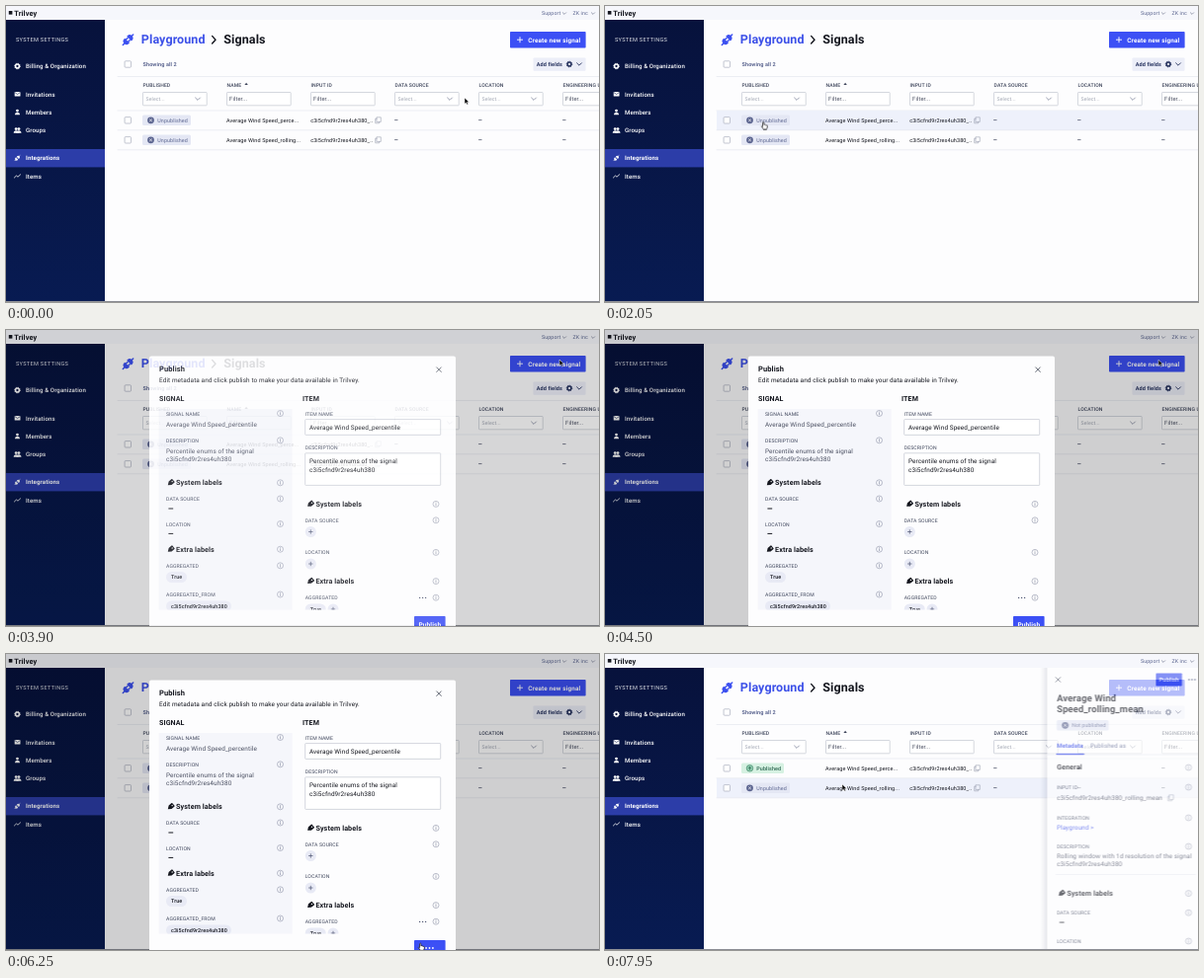
Write an HTML page that moves like this. It is 600 by 300 pixels and loops after 8 s.

```html
<!DOCTYPE html>
<html lang="en">
<head>
<meta charset="utf-8">
<title>Publishing a signal</title>
<style>
html, body { margin: 0; width: 100%; height: 100%; overflow: hidden; background: #fdfdfe; }
svg { display: block; width: 100vw; height: 100vh; }
text { font-family: Roboto, Arial, sans-serif; letter-spacing: .1px; fill: #15171f; text-rendering: geometricPrecision; white-space: pre; }
.bold { font-weight: 700; }
.mid { font-weight: 500; }
.white { fill: #fff; }
.blue { fill: #3c50e8; }
.soft { fill: #4b5062; }
.label { fill: #3f465c; }
.slate { fill: #5d6791; }
.navy { fill: #27335f; }
.hint { fill: #a3a8b5; }
.line { fill: none; stroke-linecap: round; stroke-linejoin: round; }

/* One loop is 8 s, so 1% is 80 ms. */
.hard, .ease { animation: 8s infinite both; }
.hard { animation-timing-function: step-end; }
.ease { animation-timing-function: linear; }
#cursor { animation-name: travel; animation-timing-function: ease-in-out; }
#arrow { animation-name: arrow; }
#hand { animation-name: hand; }
#hover1 { animation-name: hover1; }
#hover2 { animation-name: hover2; }
#before { animation-name: before; }
#after { animation-name: after; }
#first { animation-name: first; }
#first .press { animation-name: press; }
#second { animation-name: second; }
#modal { animation-name: modal; }
#idle { animation-name: idle; }
#busy { animation-name: busy; }

@keyframes travel {
  0%, 18.75% { transform: translate(464px, 93px); }
  24.75%, 31.9% { transform: translate(160px, 117.5px); }
  39%, 47.4% { transform: translate(559px, 30.5px); }
  47.5%, 56% { transform: translate(560px, 30px); }
  70%, 79.4% { transform: translate(419px, 293px); }
  86.25%, 89.4% { transform: translate(402px, 279px); }
  96.25%, 100% { transform: translate(240px, 132px); }
}
@keyframes hand {
  0% { opacity: 0; } 22% { opacity: 1; } 33.8% { opacity: 0; }
  38.5% { opacity: 1; } 47.5% { opacity: 0; } 69.2% { opacity: 1; } 78.75%, 100% { opacity: 0; }
}
@keyframes arrow {
  0% { opacity: 1; } 22% { opacity: 0; } 33.8% { opacity: 1; }
  38.5% { opacity: 0; } 47.5% { opacity: 1; } 69.2% { opacity: 0; } 78.75%, 100% { opacity: 1; }
}
@keyframes hover1 { 0% { opacity: 0; } 22% { opacity: 1; } 33.8%, 100% { opacity: 0; } }
@keyframes hover2 { 0% { opacity: 0; } 94.9%, 100% { opacity: 1; } }
@keyframes before { 0% { opacity: 1; } 80%, 100% { opacity: 0; } }
@keyframes after { 0% { opacity: 0; } 80%, 100% { opacity: 1; } }
@keyframes first {
  0%, 28.1% { opacity: 0; transform: translateX(14px); }
  29.4% { opacity: .62; transform: translateX(5.5px); }
  30.4%, 47.4% { opacity: 1; transform: none; }
  47.5%, 100% { opacity: 0; transform: none; }
}
@keyframes second {
  0%, 98.1% { opacity: 0; transform: translateX(14px); }
  99.375% { opacity: .62; transform: translateX(5.5px); }
  100% { opacity: 1; transform: none; }
}
@keyframes press { 0% { fill: #3c50f0; } 38.5%, 100% { fill: #2e3fc4; } }
@keyframes modal {
  0%, 47.2% { opacity: 0; } 49%, 78.7% { opacity: 1; } 78.75%, 100% { opacity: 0; }
}
@keyframes idle { 0% { opacity: 1; } 75% { opacity: 0; } 78.75%, 100% { opacity: 1; } }
@keyframes busy { 0% { opacity: 0; } 75% { opacity: 1; } 78.75%, 100% { opacity: 0; } }
</style>
</head>
<body>
<script>
const ID = 'c3i5cfnd9r2res4uh380';
const BRAND = 'Trilvey';

const text = (x, y, str, size = 6.4, cls = '') =>
  `<text x="${x}" y="${y}" font-size="${size}" class="${cls}">${str}</text>`;
const rect = (x, y, w, h, fill, r = 0, extra = '') =>
  `<rect x="${x}" y="${y}" width="${w}" height="${h}" rx="${r}" fill="${fill}" ${extra}/>`;
const line = (d, color = '#15171f', width = .8) =>
  `<path class="line" d="${d}" stroke="${color}" stroke-width="${width}"/>`;
const dot = (x, y, r, fill, extra = '') => `<circle cx="${x}" cy="${y}" r="${r}" fill="${fill}" ${extra}/>`;
const group = (x, y, body, scale = 1, turn = 0) =>
  `<g transform="translate(${x} ${y}) rotate(${turn}) scale(${scale})">${body}</g>`;

const box = (x, y, w, h) => rect(x, y, w, h, '#fff', .6, 'stroke="#c3c7d2" stroke-width=".7"');
const check = (x, y) => rect(x - 3.2, y - 3.2, 6.4, 6.4, '#fff', .8, 'stroke="#a9aebd" stroke-width=".7"');
const chevron = (x, y, color = '#8e94a6', s = 2.4) =>
  line(`M${x - s} ${y - s / 2}l${s} ${s}l${s} ${-s}`, color, .9);
const cross = (x, y, s = 2.3, color = '#3e4454', w = .8) =>
  line(`M${x - s} ${y - s}l${2 * s} ${2 * s}m0 ${-2 * s}l${-2 * s} ${2 * s}`, color, w);
const plus = (x, y, s, color, w = .8) => line(`M${x - s} ${y}h${2 * s}M${x} ${y - s}v${2 * s}`, color, w);
const info = (x, y) => dot(x, y, 3, 'none', 'stroke="#8f94a8" stroke-width=".6"') +
  line(`M${x} ${y - .3}v1.7M${x} ${y - 1.5}v.1`, '#8f94a8', .7);
const copy = (x, y) => line(`M${x - 1.2} ${y - 3}h4v4.6h-4zM${x - 1.2} ${y - 1.6}h-1.6v4.6h4v-1.4`, '#9a9fb0', .6);
const dots = (x, y, color, gap = 3, r = .8) => [-gap, 0, gap].map(d => dot(x + d, y, r, color)).join('');
const gear = (x, y, color) =>
  `<g fill="none" stroke="${color}"><circle cx="${x}" cy="${y}" r="1.9" stroke-width="1.5"/>
  <circle cx="${x}" cy="${y}" r="2.8" stroke-width="1" stroke-dasharray="1.1 1.1"/></g>`;
const plug = (x, y, color, scale) => group(x, y,
  `<path fill="${color}" d="M-1.2-3.4v6.8h-1a3.4 3.4 0 0 1 0-6.8zM1.5-3.4v6.8h.8a3.4 3.4 0 0 0 0-6.8z"/>` +
  line('M-7.5 0h3M4.5 0h3M-1.2-1.6h2M-1.2 1.6h2', color, 1.5), scale, -45);
const tag = (x, y) => group(x, y,
  '<path fill="#15171f" d="M-4 0l3.2-2.4h4q.6 0 .6.6v3.6q0 .6-.6.6h-4z"/><circle cx="2" cy="0" r=".7" fill="#fff"/>', .95, -40);
const heading = (x, y, str, infoX) => tag(x, y) + text(x + 5.4, y + 2.4, str, 7.2, 'bold') + info(infoX, y);
const label = (x, y, str, infoX) => text(x, y, str, 5.1, 'label') + (infoX ? info(infoX, y - 2) : '');
const dash = (x, y) => line(`M${x} ${y}h4`, '#15171f', 1);
const pill = (x, y, w, str) => rect(x, y, w, 11, '#e8eaf5', 5.5) + text(x + 5, y + 7.4, str, 5.4, 'mid');
const addPill = (x, y) => dot(x, y, 5.5, '#e8eaf5') + plus(x, y, 1.8, '#4b5270', .7);

const badge = (x, y, w, str) => rect(x, y - 5.3, w, 10.6, '#e4e7f4', 1.5) +
  dot(x + 8.5, y, 3.4, '#5b648f') + cross(x + 8.5, y, 1.1, '#fff', .7) + text(x + 15.3, y + 1.9, str, 5.35, 'slate');
const publishedBadge = (x, y) => rect(x, y - 5.3, 43, 10.6, '#d6f1e2', 1.5) +
  dot(x + 8.5, y, 3.3, '#8ccbad', 'stroke="#3d8064" stroke-width=".6"') +
  line(`M${x + 8.5} ${y + 1.4}v-2.6m-1.2 1.2l1.2-1.2l1.2 1.2`, '#2c6650', .7) +
  `<g style="--x:0">${text(x + 15.3, y + 1.9, 'Published', 5.4, 'mid').replace('<text', '<text style="fill:#2c6650"')}</g>`;

function header() {
  return rect(0, 0, 600, 14, '#f6f7fc') + rect(2.8, 5, 3.6, 3.6, '#15171f') +
    text(8.3, 9.8, BRAND, 7.4, 'bold') +
    text(542, 9.4, 'Support', 5.3, 'slate') + chevron(565, 7.6, '#8e94a6', 1.6) +
    text(573.5, 9.4, 'ZK inc', 5.3, 'slate') + chevron(594, 7.6, '#8e94a6', 1.6);
}

function sidebar() {
  const items = [['Billing &amp; Organization', 61], ['Invitations', 89.3], ['Members', 107.5],
    ['Groups', 126], ['Integrations', 154.2], ['Items', 172.6]];
  const person = (x, y) => dot(x, y - 1.4, 1.4, '#fff') + `<path fill="#fff" d="M${x - 2.5} ${y + 2.7}q0-2.5 2.5-2.5t2.5 2.5z"/>`;
  return rect(0, 14, 100, 286, 'url(#night)') + rect(0, 145, 100, 18.4, '#2c3da8') +
    text(10, 36.2, 'SYSTEM SETTINGS', 5.6, 'white').replace('<text', '<text style="letter-spacing:.3px" opacity=".85"') +
    items.map(([name, y]) => text(20, y + 2.2, name, 6.1, 'white ' + (y > 150 && y < 160 ? 'bold' : 'mid'))).join('') +
    gear(11.5, 61, '#fff') +
    rect(8.7, 87, 5.8, 4.6, '#fff', .6) + line('M9 87.6l2.6 2l2.6-2', '#0a1848', .6) +
    person(11.5, 107.5) + person(10.2, 126) + person(13, 126) +
    plug(11.5, 154.2, '#fff', .48) + line('M8.4 174l2-2l1.6 1.2l2.6-2.4', '#fff', .8);
}

function row(y, name) {
  return check(123.3, y) + text(223, y + 1.9, name, 5.5) + text(308.2, y + 1.9, ID + '_..', 5.5) +
    copy(376.5, y) + [393.5, 478.5, 563.5].map(x => line(`M${x} ${y - .2}h2.6`, '#3f465c', .7)).join('') +
    line(`M113 ${y + 10}H600`, '#e6e8f0', .7);
}

function table() {
  const columns = [['PUBLISHED', 1], ['NAME', 0], ['INPUT ID', 0], ['DATA SOURCE', 1], ['LOCATION', 1], ['ENGINEERING UNIT', 0]];
  return plug(123.5, 34.2, '#3c50f0', .98) + text(136.8, 38.3, 'Playground', 12.5, 'bold blue') +
    line('M208.6 30.4l3.4 3.8l-3.4 3.8', '#15171f', 1.4) + text(220.3, 38.3, 'Signals', 12.5, 'bold') +
    rect(510, 26, 76.6, 16.6, '#3c50f5', .8) + plus(520, 34.2, 2.6, '#fff', .9) +
    text(528.3, 36.5, 'Create new signal', 6.4, 'bold white') +
    check(123.3, 59) + text(138.5, 61, 'Showing all 2', 5.5, 'bold slate') +
    rect(533.5, 52.4, 53, 13.4, '#eceef8', .8) + text(536.8, 61, 'Add fields', 5.5, 'bold navy') +
    gear(570, 59, '#27335f') + chevron(580, 59, '#27335f') +
    line('M113 71.5H600M113 106H600', '#e6e8f0', .7) +
    columns.map(([name, select], i) => {
      const x = 138.5 + 85 * i;
      return text(x, 81.8, name, 5.1, 'label mid') + box(x, 87.5, 64.7, 13.3) +
        (select ? text(x + 3, 96, 'Select...', 5.2, 'hint') + chevron(x + 55.5, 94.2)
                : text(x + 2.6, 96.1, 'Filter...', 5.8, 'soft'));
    }).join('') +
    '<path d="M241.4 80l1.7-2.2l1.7 2.2z" fill="#3f465c"/>' +
    `<g id="hover1" class="hard">${rect(113, 106, 487, 20, '#eef1fb')}</g>
     <g id="hover2" class="hard">${rect(113, 126, 487, 19.8, '#eef1fb')}</g>` +
    row(115.8, 'Average Wind Speed_perce...') + row(135.8, 'Average Wind Speed_rolling...') +
    `<g id="before" class="hard">${badge(138, 115.8, 49, 'Unpublished')}</g>
     <g id="after" class="hard">${publishedBadge(138, 115.8)}</g>` + badge(138, 135.8, 49, 'Unpublished');
}

function details(id, kind, about, copyX) {
  const x = 451.7, at = 585;
  return `<g id="${id}" class="ease">` + rect(435, 14, 7, 286, 'url(#shade)') + rect(442, 14, 174, 286, '#fdfdfe') +
    cross(453, 26) + rect(552, 19.4, 26.4, 13.2, '#3c50f0', .8, 'class="press hard"') +
    text(555.2, 28, 'Publish', 5.8, 'bold white') + dots(588.5, 26, '#27335f') +
    text(x, 48.4, 'Average Wind', 9.5, 'bold') + text(x, 58.8, 'Speed_' + kind, 9.5, 'bold') +
    badge(x, 72.3, 52.5, 'Not published') +
    text(x, 94.6, 'Metadata', 6.1, 'bold blue') + text(485.8, 94.6, 'Published as', 6.1, 'slate') +
    line('M442 102H616', '#e3e5ee', .7) + line(`M${x} 101.5h27.3`, '#3c50e8', 1.3) +
    text(x, 117.4, 'General', 7.2, 'bold') + info(at, 115) +
    label(x, 137, 'INPUT ID', at) + text(x, 148, `${ID}_${kind}`, 6.4, 'soft') + copy(copyX, 145.8) +
    label(x, 168, 'INTEGRATION', at) + text(x, 178, 'Playground &gt;', 6.3, 'blue') +
    label(x, 197, 'DESCRIPTION', at) + text(x, 207.2, about, 6.4, 'soft') + text(x, 215.4, ID, 6.4, 'soft') +
    line('M451 223.5H592', '#e6e8f0', .7) + heading(456.5, 242.6, 'System labels', at) +
    label(x, 264.2, 'DATA SOURCE', at) + dash(454.8, 272) + label(x, 293, 'LOCATION', at) + '</g>';
}

function modal() {
  const about = 'Percentile enums of the signal', name = 'Average Wind Speed_percentile';
  const L = 162, R = 302.7, li = 277.5, ri = 435;
  const left = rect(154.6, 80, 135, 204, '#f5f6fb') +
    label(L, 86.5, 'SIGNAL NAME', li) + text(L, 97.6, name, 6.4, 'soft') +
    label(L, 113.8, 'DESCRIPTION', li) + text(L, 125, about, 6.4, 'soft') + text(L, 133.3, ID, 6.4, 'soft') +
    heading(166.7, 154.8, 'System labels', li) + label(L, 173, 'DATA SOURCE', li) + dash(164.8, 181) +
    label(L, 198.5, 'LOCATION', li) + dash(164.8, 206.4) +
    heading(166.7, 222.2, 'Extra labels', li) + label(L, 240.8, 'AGGREGATED', li) + pill(L, 245, 21, 'True') +
    label(L, 270, 'AGGREGATED_FROM', li) + pill(L, 274.4, 66, ID);
  const right = label(R, 86.6, 'ITEM NAME') + box(R, 90.6, 137, 15.8) + text(307, 100.9, name) +
    label(R, 120.6, 'DESCRIPTION') + box(R, 124.8, 137, 32.6) + text(307, 135.4, about) + text(307, 143.7, ID) +
    heading(308, 176.4, 'System labels', ri) + label(R, 194.8, 'DATA SOURCE', ri) + addPill(308.3, 204.5) +
    label(R, 227.4, 'LOCATION', ri) + addPill(308.3, 237) +
    heading(308, 254.6, 'Extra labels', ri) + label(R, 273.2, 'AGGREGATED', ri) + dots(421.6, 271.4, '#4b5270', 3, .7) +
    pill(R, 277.4, 21, 'True') + addPill(331, 283);
  return `<g id="modal" class="ease">` + rect(0, 0, 600, 300, '#000', 0, 'opacity=".18"') +
    rect(145, 26.6, 310, 290, '#fdfdfe', 2) + text(155, 42.4, 'Publish', 7.5, 'bold') + cross(438, 40.2) +
    text(155, 53, `Edit metadata and click publish to make your data available in ${BRAND}.`) +
    text(155, 72.3, 'SIGNAL', 7.1, 'bold') + text(300, 72.3, 'ITEM', 7.1, 'bold') +
    `<g clip-path="url(#scroll)">${left}${right}</g>` +
    rect(413, 290, 31.6, 20, '#3c50f5', .8) +
    `<g id="idle" class="hard">${text(417.4, 300.6, 'Publish', 6.6, 'bold white')}</g>
     <g id="busy" class="hard">${dots(428.5, 298, '#fff', 3.4, .9)}</g></g>`;
}

const cursor = `<g id="cursor" class="ease">
  <path id="arrow" class="hard" d="M0 0v6.2l1.5-1.3l1 2.2l1.1-.5l-1-2.1h2z" fill="#000" stroke="#fff" stroke-width=".5"/>
  <path id="hand" class="hard" d="M-.4.6q.7-.9 1.3 0v2.3q1-.5 1.3.2q.9-.4 1.2.3q1-.2 1 .7q0 1.9-.9 3.2H.3L-1.7 4.6q.2-.9 1.3 0z"
    fill="#fff" stroke="#111" stroke-width=".7" stroke-linejoin="round"/></g>`;

document.body.innerHTML = `<svg viewBox="0 0 600 300">
  <defs>
    <linearGradient id="night" x2="0" y2="1"><stop stop-color="#07123c"/><stop offset="1" stop-color="#081b52"/></linearGradient>
    <linearGradient id="shade"><stop stop-color="#20284a" stop-opacity="0"/><stop offset="1" stop-color="#20284a" stop-opacity=".16"/></linearGradient>
    <clipPath id="scroll"><rect x="145" y="79" width="310" height="204.5"/></clipPath>
  </defs>` +
  rect(0, 0, 600, 300, '#fdfdfe') + table() + sidebar() +
  details('first', 'percentile', 'Percentile enums of the signal', 558.6) +
  details('second', 'rolling_mean', 'Rolling window with 1d resolution of the signal', 567) +
  header() + rect(0, 299, 600, 1, '#8d8f96') + modal() + cursor + '</svg>';
</script>
</body>
</html>
```
